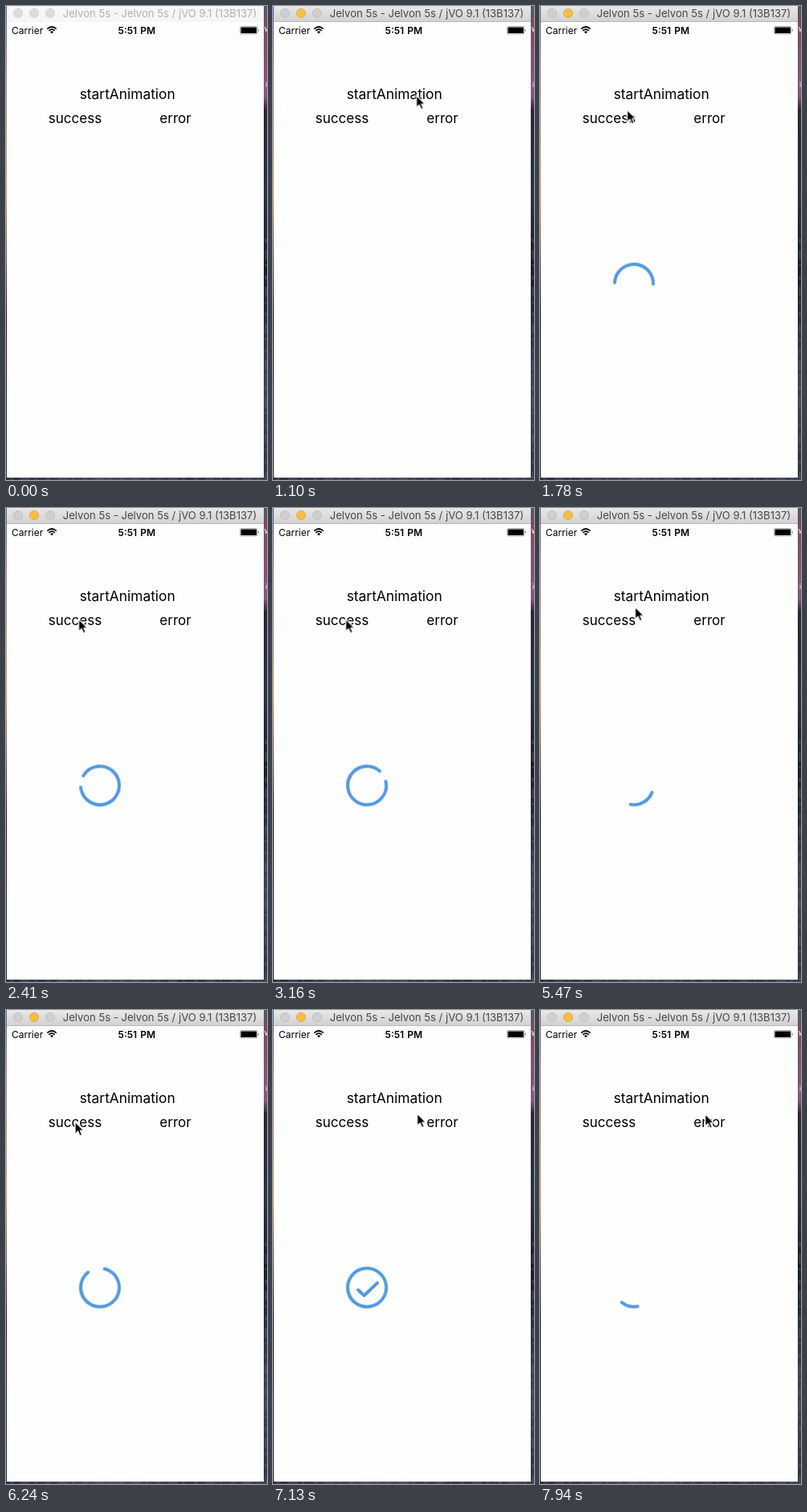
An HTML page for the animation above (8 s loop, 325x591 px).

```html
<!DOCTYPE html>
<html lang="en">
<head>
<meta charset="utf-8">
<title>Loading ring</title>
<style>
  html, body { margin: 0; width: 100%; height: 100%; overflow: hidden; background: #1b1c2b; }
  svg { display: block; width: 325px; height: 591px; }
  text { font-family: Inter, "Open Sans", sans-serif; }
  .mid { text-anchor: middle; }
  .start { font-size: 17.35px; }
  .button { font-size: 17px; }
  .status { font-size: 12px; }
  .title { font-size: 13.1px; }
  .clock { font-weight: 600; word-spacing: 1px; }

  .active, .ring, .spin, .check, .cursor { animation: 8s linear infinite; }

  .active { animation-name: activate; animation-timing-function: step-end; }
  @keyframes activate {
    0% { visibility: hidden; }
    10%, 100% { visibility: visible; }
  }

  .mark { fill: none; stroke: #5199df; stroke-width: 4; stroke-linecap: round; stroke-linejoin: round; }

  .ring { animation-name: ring-show; animation-timing-function: step-end; }
  @keyframes ring-show {
    0% { visibility: hidden; }
    14.75%, 100% { visibility: visible; }
  }

  /* turns back about 297 degrees a second while the arc grows to 324 */
  .spin { transform-origin: 117px 346px; animation-name: spin; }
  @keyframes spin {
    0%, 14.75% { transform: rotate(0deg); stroke-dasharray: 0 720; }
    28.39% { transform: rotate(-324deg); stroke-dasharray: 324 720; }
    43.5% { transform: rotate(-683deg); stroke-dasharray: 324 720; }
    43.51%, 65.03% { transform: rotate(-683deg); stroke-dasharray: 360 720; }
    65.04% { transform: rotate(0deg); stroke-dasharray: 0 720; }
    78.68% { transform: rotate(-324deg); stroke-dasharray: 324 720; }
    78.75%, 97.14% { transform: rotate(-326deg); stroke-dasharray: 360 720; }
    97.15% { transform: rotate(0deg); stroke-dasharray: 0 720; }
    100% { transform: rotate(-68deg); stroke-dasharray: 68 720; }
  }

  .check { animation-name: check-show; animation-timing-function: step-end; }
  .check path { stroke-dasharray: 1 2; animation: check-draw 8s linear infinite; }
  @keyframes check-show {
    0% { visibility: hidden; }
    45.375% { visibility: visible; }
    65.04% { visibility: hidden; }
    79.5% { visibility: visible; }
    97.15%, 100% { visibility: hidden; }
  }
  @keyframes check-draw {
    0%, 45.375% { stroke-dashoffset: 1; }
    53%, 79.49% { stroke-dashoffset: 0; }
    79.5% { stroke-dashoffset: 1; }
    87.125%, 100% { stroke-dashoffset: 0; }
  }

  .cursor { animation-name: point; }
  @keyframes point {
    0%, 5.2% { transform: translate(290px, 595px); }
    8% { transform: translate(232px, 300px); }
    11.25% { transform: translate(185px, 127px); }
    13.5%, 16.5% { transform: translate(178.5px, 111.3px); }
    19.5% { transform: translate(142px, 119px); }
    22.25% { transform: translate(108.5px, 129.3px); }
    24.75% { transform: translate(89px, 138.5px); }
    25.8%, 56.4% { transform: translate(90.5px, 138.5px); }
    58.625% { transform: translate(135.5px, 114.5px); }
    61.6%, 65.2% { transform: translate(141px, 110px); }
    70% { transform: translate(107px, 130px); }
    74%, 79.5% { transform: translate(86px, 139.3px); }
    84.75% { transform: translate(137px, 141px); }
    89.5% { transform: translate(183px, 128px); }
    94.5% { transform: translate(173px, 112px); }
    95.6%, 97.5% { transform: translate(172px, 111px); }
    99.25% { transform: translate(205.5px, 129.5px); }
    100% { transform: translate(212px, 137px); }
  }
</style>
</head>
<body>
<svg viewBox="0 0 325 591">
  <defs>
    <linearGradient id="bar" x2="0" y2="1">
      <stop offset="0" stop-color="#e9e8e9"/><stop offset="1" stop-color="#d2d1d2"/>
    </linearGradient>
    <linearGradient id="left" x2="0" y2="1">
      <stop offset="0" stop-color="#4f6f9c"/><stop offset=".15" stop-color="#a58a92"/>
      <stop offset=".4" stop-color="#d99a68"/><stop offset=".55" stop-color="#6a4a55"/>
      <stop offset=".65" stop-color="#1c1b2a"/><stop offset="1" stop-color="#2a2d3f"/>
    </linearGradient>
    <linearGradient id="right" x2="0" y2="1">
      <stop offset="0" stop-color="#51586f"/><stop offset=".04" stop-color="#7c4a63"/>
      <stop offset=".19" stop-color="#8a5684"/><stop offset=".22" stop-color="#2c2436"/>
      <stop offset=".4" stop-color="#2b3048"/><stop offset=".55" stop-color="#1a1c2b"/>
      <stop offset=".8" stop-color="#3d4258"/><stop offset="1" stop-color="#2f3346"/>
    </linearGradient>
    <linearGradient id="floor">
      <stop offset="0" stop-color="#2c3042"/><stop offset=".4" stop-color="#4a4f62"/>
      <stop offset=".7" stop-color="#343849"/><stop offset="1" stop-color="#3e4356"/>
    </linearGradient>
  </defs>

  <rect width="2" height="591" fill="url(#left)"/>
  <rect x="320" width="5" height="591" fill="url(#right)"/>
  <rect y="587" width="325" height="4" fill="url(#floor)"/>
  <path d="M323.5 290V588M4 589.5H320" fill="none" stroke="#6b7084" stroke-opacity=".4"
    stroke-width="2" stroke-dasharray="5 9 12 6 3 11"/>
  <text x="321.5" y="32" font-size="10" fill="#fff">w</text>
  <text x="323" y="101" font-size="9" fill="#fff">i</text>

  <rect x="1" y="19" width="320" height="569" fill="#fefefe"/>
  <rect x="1" width="320" height="20" fill="#f6f6f6"/>
  <g fill="#dcdcdc" stroke="#cfcfcf" stroke-width=".8">
    <circle cx="15" cy="9" r="5.6"/><circle cx="35" cy="9" r="5.6"/><circle cx="55" cy="9" r="5.6"/>
  </g>
  <text class="title mid" x="191.5" y="14" fill="#b1b1b1">Jelvon 5s - Jelvon 5s / jVO 9.1 (13B137)</text>

  <g class="active">
    <rect x="1" width="320" height="20" fill="url(#bar)"/>
    <rect x="1" y="19" width="320" height="1" fill="#b9b8b9"/>
    <g fill="#d0cfd0" stroke="#bdbcbd" stroke-width=".8">
      <circle cx="15" cy="9" r="5.6"/><circle cx="55" cy="9" r="5.6"/>
      <circle cx="35" cy="9" r="5.6" fill="#f7be45" stroke="#dda43a"/>
    </g>
    <text class="title mid" x="191.5" y="14" fill="#474747">Jelvon 5s - Jelvon 5s / jVO 9.1 (13B137)</text>
  </g>

  <text class="status" x="7" y="34.5">Carrier</text>
  <g fill="none" stroke="#000" stroke-width="1.7">
    <path d="M51.3 28.6Q57 23.4 62.7 28.6M53.3 30.9Q57 27.5 60.7 30.9"/>
    <path d="M55 32.2Q57 30.4 59 32.2L57 34.6Z" fill="#000" stroke="none"/>
  </g>
  <text class="status clock mid" x="162.8" y="34.5">5:51 PM</text>
  <rect x="291.5" y="25.5" width="21.5" height="9.5" rx="1.6" fill="none" stroke="#777" stroke-width=".6"/>
  <rect x="292.5" y="26.5" width="19.5" height="7.5" rx=".6"/>
  <path d="M313.8 28.6Q315.4 30.2 313.8 32Z"/>

  <text class="start mid" x="151.2" y="116">startAnimation</text>
  <text class="button mid" x="86" y="146">success</text>
  <text class="button mid" x="211" y="146">error</text>

  <g class="mark">
    <g class="ring">
      <path class="spin" pathLength="360" d="M93 346A24 24 0 0 0 141 346A24 24 0 0 0 93 346"/>
    </g>
    <g class="check"><path pathLength="1" d="M106 349L113.5 356L130 340.3"/></g>
  </g>

  <g class="cursor">
    <path d="M0 0V15.5L3.6 12.2L6 17.6L8.8 16.4L6.5 11.2H11.2Z" stroke="#fff" stroke-width="1.3"/>
  </g>
</svg>
</body>
</html>
```
